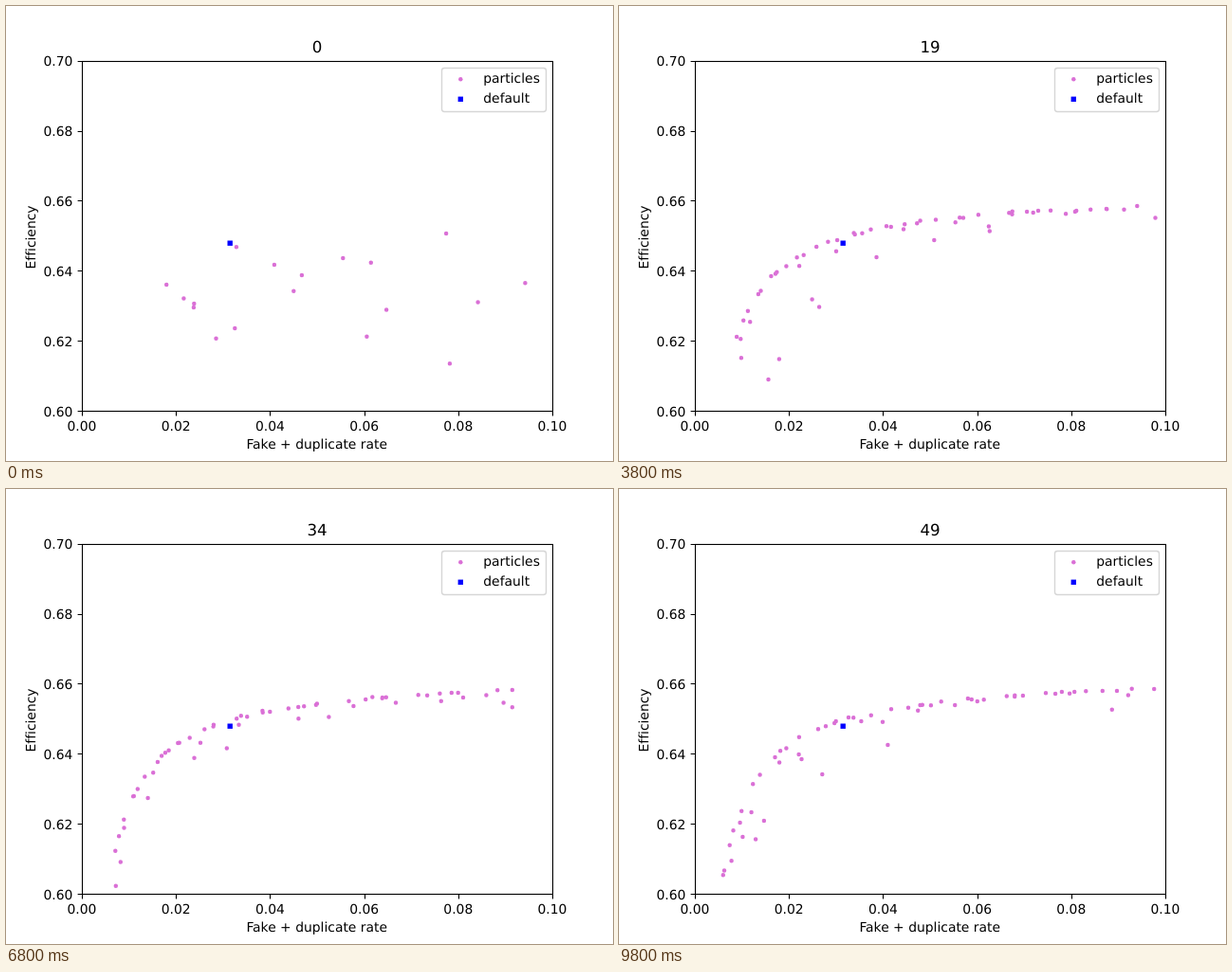
Animation, 640 px wide and 480 px high, one loop 10000 ms. Source, as an HTML page:

```html
<!DOCTYPE html>
<html lang="en">
<head>
<meta charset="utf-8">
<title>Particle front</title>
<style>
  html, body { margin: 0; width: 100%; height: 100%; overflow: hidden; background: #fff; }
  svg { display: block; width: 640px; height: 480px; }
  text {
    font: 13.89px "DejaVu Sans", sans-serif;
    font-variant-ligatures: none;
    text-rendering: geometricPrecision;
  }
  .mid { text-anchor: middle; }
  .end { text-anchor: end; }
  #title { font-size: 16.67px; }
  .axis { fill: none; stroke: #000; stroke-width: 1.11; }
  .dots { fill: none; stroke: #da70d6; stroke-width: 4.5; stroke-linecap: round; }
  .default { fill: #00f; }
</style>
</head>
<body>
<svg viewBox="0 0 640 480">
  <defs><clipPath id="plot"><rect x="80" y="57.6" width="496" height="369.6"/></clipPath></defs>
  <g clip-path="url(#plot)"><path id="particles" class="dots"/></g>
  <rect class="default" x="233.5" y="247.5" width="5.4" height="5.4"/>
  <path id="ticks" class="axis"/>
  <g id="labels"></g>
  <rect class="axis" x="80.5" y="58.5" width="496" height="369"/>
  <text id="title" class="mid" x="328" y="49">0</text>
  <text class="mid" x="327.7" y="467">Fake + duplicate rate</text>
  <text class="mid" transform="translate(31.3 244) rotate(-90)">Efficiency</text>
  <rect x="459.5" y="65.5" width="110" height="46" rx="2.8" fill="#fff" fill-opacity=".8" stroke="#ccc" stroke-opacity=".8" stroke-width="1.39"/>
  <path class="dots" d="M479.3 77.3h0"/>
  <rect class="default" x="476.6" y="95.6" width="5.4" height="5.4"/>
  <text x="503.3" y="81">particles</text>
  <text x="503.3" y="102">default</text>
</svg>
<script>
const STEP = 200, GENERATIONS = 50, SETTLED = 11;
const byId = id => document.getElementById(id);

function seeded(seed) {
  let s = seed * 7919 + 17;
  return () => {
    s = s + 0x6d2b79f5 | 0;
    let t = Math.imul(s ^ s >>> 15, 1 | s);
    t = t + Math.imul(t ^ t >>> 7, 61 | t) ^ t;
    return ((t ^ t >>> 14) >>> 0) / 4294967296;
  };
}

// Dots hug a hyperbola that reaches further left each generation; a few lag below it.
function swarm(gen) {
  const random = seeded(gen);
  const spread = Math.max(0, 1 - gen / SETTLED);
  const count = Math.round(59 - 41 * spread);
  const left = 108 + 60 * Math.exp(-gen / 14);
  const right = 552 + 24 * random();
  let path = '';
  for (let i = 0; i < count; i++) {
    const u = (i + 2 * random()) / (count + 1);
    const x = left + (right - left) * u ** 1.5;
    const lag = 1.2 * random() ** 6;
    const y = 193 + 8100 / (x - 72) * (1 + lag) + 3 * random() + 170 * spread * random();
    path += `M${x.toFixed(1)} ${y.toFixed(1)}h0`;
  }
  return path;
}

function drawTicks() {
  let marks = '', labels = '';
  for (let i = 0; i <= 5; i++) {
    const x = 80 + 99.2 * i, y = 427.2 - 73.92 * i;
    marks += `M${Math.round(x) + .5} 427.5v4.9M80.5 ${Math.round(y) + .5}h-4.9`;
    labels += `<text class="mid" x="${x}" y="448">${(i * .02).toFixed(2)}</text>` +
      `<text class="end" x="70.3" y="${Math.round(y + 5.3)}">${(.6 + i * .02).toFixed(2)}</text>`;
  }
  byId('ticks').setAttribute('d', marks);
  byId('labels').innerHTML = labels;
}

const start = performance.now();
let shown = -1;
function tick() {
  const gen = Math.floor((performance.now() - start) / STEP) % GENERATIONS;
  if (gen !== shown) {
    shown = gen;
    byId('title').textContent = gen;
    byId('particles').setAttribute('d', swarm(gen));
  }
  requestAnimationFrame(tick);
}

drawTicks();
tick();
</script>
</body>
</html>
```
